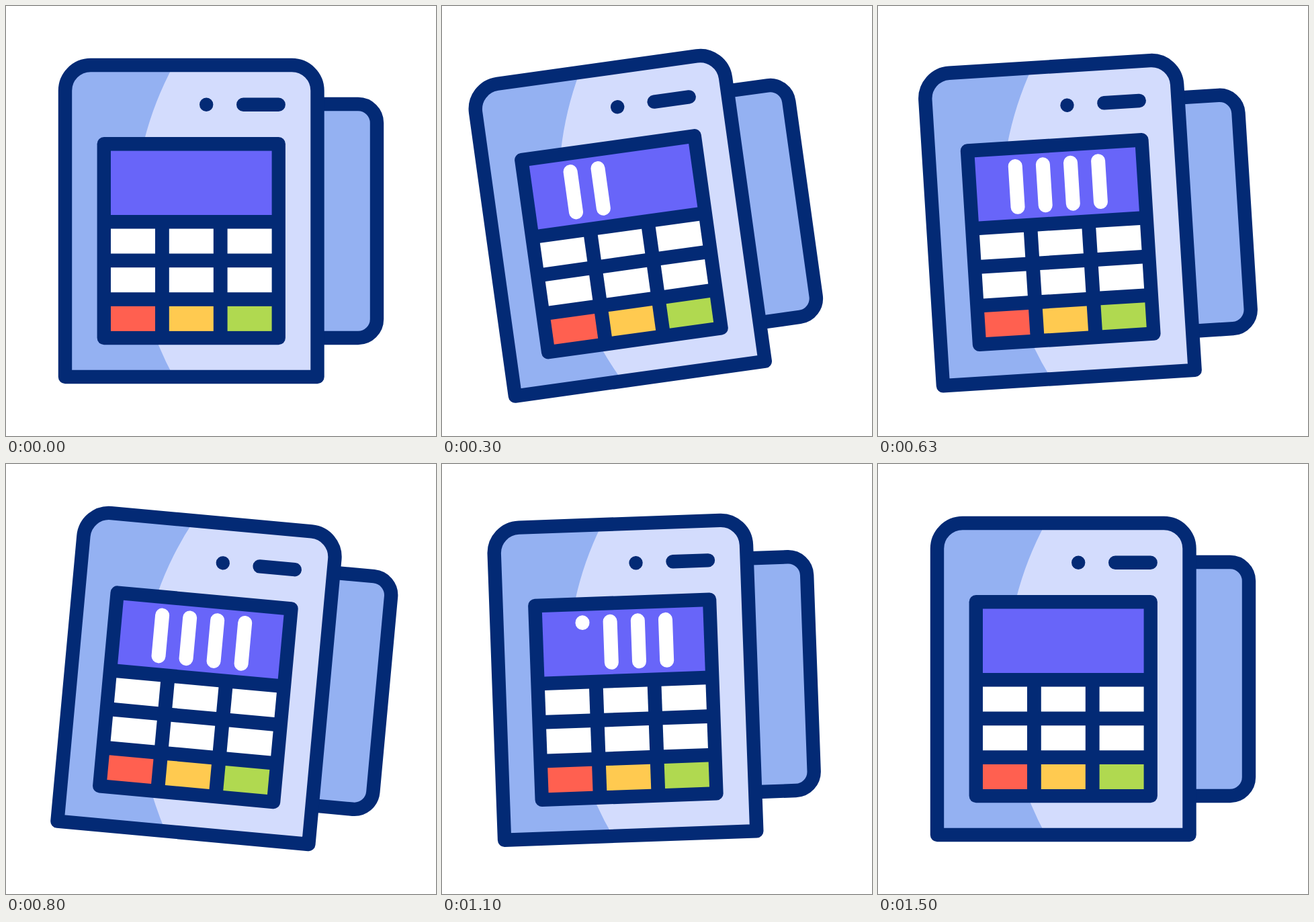
Write an HTML page that moves like this. It is 640x640 px and loops after 2000 ms.

```html
<!DOCTYPE html>
<html lang="en">
<head>
<meta charset="utf-8">
<title>Card terminal</title>
<style>
  html, body { margin: 0; width: 100%; height: 100%; overflow: hidden; background: #fff; }
  svg { display: block; width: 100%; height: 100%; }
  .line { stroke: #032a75; stroke-width: 20.4; stroke-linecap: round; stroke-linejoin: round; }
  .bar { stroke: #fff; stroke-width: 21; stroke-linecap: round; }
</style>
</head>
<body>
<svg viewBox="0 0 640 640">
  <g id="terminal">
    <path class="line" fill="#94b1f2" d="M463 146H524a28 28 0 0 1 28 28V466a28 28 0 0 1-28 28H463"/>
    <path fill="#d3dcfd" d="M88 552V126a38 38 0 0 1 38-38H425.5a38 38 0 0 1 38 38V552Z"/>
    <path fill="#94b1f2" d="M88 552V126a38 38 0 0 1 38-38H249.5A487 487 0 0 0 249.5 552Z"/>
    <path class="line" fill="none" d="M88 552V126a38 38 0 0 1 38-38H425.5a38 38 0 0 1 38 38V552Z"/>
    <path class="line" d="M298.2 146.8h.01M353.2 146.8H405.7"/>
    <rect x="135.6" y="195" width="280.3" height="309.3" rx="10.2" fill="#032a75"/>
    <rect x="156" y="215.6" width="239.6" height="95.4" fill="#6865f9"/>
  </g>
</svg>
<script>
const terminal = document.getElementById('terminal');

function add(tag, attrs) {
  const el = document.createElementNS('http://www.w3.org/2000/svg', tag);
  for (const name in attrs) el.setAttribute(name, attrs[name]);
  return terminal.appendChild(el);
}

const bottomKeys = ['#ff6050', '#ffca50', '#b0d950'];
for (let row = 0; row < 3; row++) {
  for (let col = 0; col < 3; col++) {
    add('rect', {
      x: 156 + 86.8 * col, y: 331.5 + 57.7 * row, width: 66, height: 37,
      fill: row === 2 ? bottomKeys[col] : '#fff'
    });
  }
}

const bars = [0, 1, 2, 3].map(i => add('line', {
  class: 'bar', x1: 215.5 + 41.2 * i, x2: 215.5 + 41.2 * i
}));

// Damped swing: [tick, degrees], 30 ticks per second
const swing = [[0, 0], [14.4, -11.6], [23.9, 5.25], [33.8, -2.2], [40, 0.75], [45, 0]];

function ease(s) {
  s = Math.min(1, Math.max(0, s));
  return s * s * (3 - 2 * s);
}

function angleAt(tick) {
  let angle = 0;
  for (let i = 1; i < swing.length; i++) {
    const [t0, a0] = swing[i - 1], [t1, a1] = swing[i];
    angle += (a1 - a0) * ease((tick - t0) / (t1 - t0));
  }
  return angle;
}

function draw(ms) {
  const tick = Math.floor((ms % 2000 + 3.4) * 0.03) % 60;
  terminal.setAttribute('transform', `rotate(${angleAt(tick)} 304.5 415.5)`);
  bars.forEach((bar, i) => {
    // Each bar draws upwards, later erases upwards
    const head = ease((tick - 3.2 - 3 * i) / 3);
    const tail = ease((tick - 30.2 - 3 * i) / 3);
    bar.setAttribute('y1', 293.5 - 61 * tail);
    bar.setAttribute('y2', 293.5 - 61 * head);
    bar.setAttribute('visibility', head > tail ? 'visible' : 'hidden');
  });
}

const start = performance.now();
function loop() {
  draw(performance.now() - start);
  requestAnimationFrame(loop);
}
loop();
</script>
</body>
</html>
```
